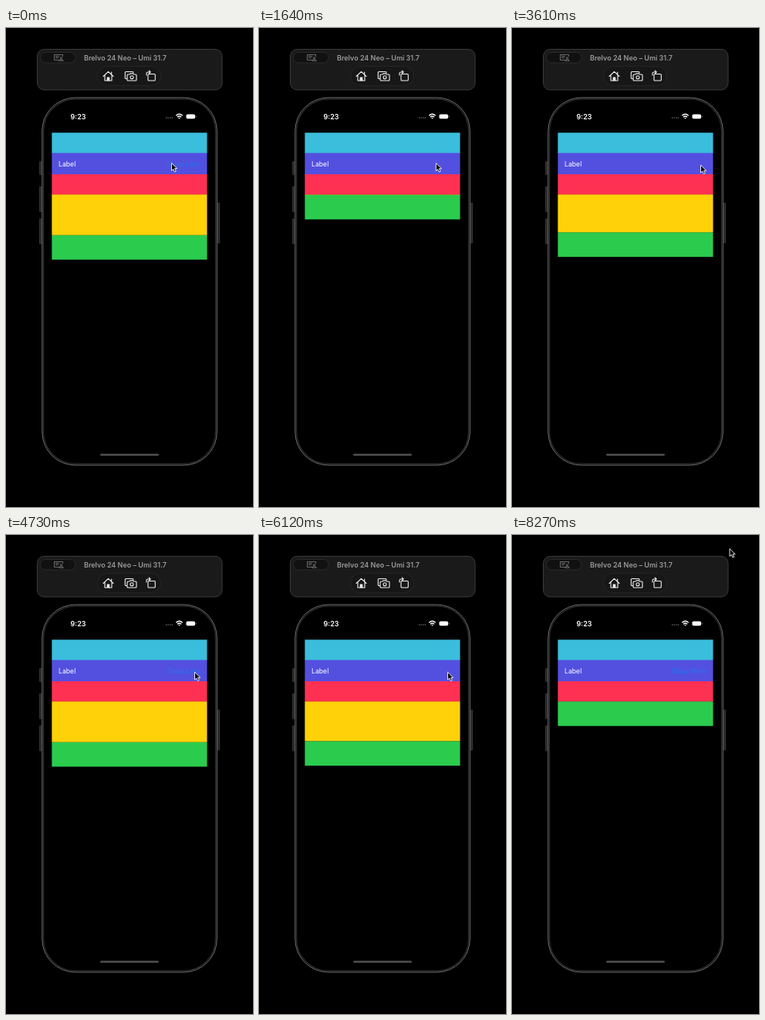
Recreate the animation shown at these times as an HTML page. Size 320x619 px, loop 8300 ms.

```html
<!DOCTYPE html>
<html lang="en">
<head>
<meta charset="utf-8">
<title>Collapsible stack</title>
<style>
  html, body { margin: 0; width: 100%; height: 100%; overflow: hidden; background: #000; }
  svg { display: block; width: 100vw; height: 100vh; }
  text { font-family: Inter, Roboto, sans-serif; }
  .icon { fill: none; stroke: #f2f2f2; stroke-width: 1.1; stroke-linejoin: round; stroke-linecap: round; }
</style>
</head>
<body>
<svg viewBox="0 0 320 619">
  <rect width="320" height="619"/>

  <!-- toolbar -->
  <rect x="40.5" y="27.5" width="239.5" height="52.5" rx="9" fill="#1a1a1a" stroke="#3b3b3b"/>
  <rect x="44.5" y="31.5" width="45.5" height="13.5" rx="6.7" fill="#111" stroke="#303030" stroke-width=".8"/>
  <g fill="none" stroke="#858585" stroke-width=".8">
    <path d="M69 41.5H62.5V34.5H73.5V37M64 36.5H69M64 38.5H68"/>
    <circle cx="71.5" cy="38.8" r="1.2"/>
    <path d="M68.8 42.3Q69 40.6 71.5 40.6T74.3 42.3Z"/>
  </g>
  <text x="154.5" y="41.5" text-anchor="middle" font-size="9" font-weight="600" fill="#9a9a9a">Brelvo 24 Neo – Umi 31.7</text>
  <rect x="118.5" y="49.5" width="82" height="25" rx="12.5" fill="#171717" stroke="#292929" stroke-width=".8"/>
  <g class="icon">
    <path d="M126 62.5L132.5 56.3L139 62.5M128 61.5V68H137V61.5M136.7 57V59.5"/>
    <path d="M131.2 68V64H133.8V68" fill="#f2f2f2"/>
    <path d="M156.5 65.5H155.3Q154.3 65.5 154.3 64.5V57.5Q154.3 56.5 155.3 56.5H164Q165 56.5 165 57.5V58"/>
    <path d="M158 60H160L161 58.9H164.5L165.500 60H168Q169 60 169 61V67Q169 68 168 68H158Q157 68 157 67V61Q157 60 158 60Z"/>
    <circle cx="163" cy="63.8" r="2"/>
    <rect x="184" y="59.500" width="9.300" height="8.500" rx="1"/>
    <path d="M182 61V59Q182 57 184 57H187M185.300 55.200L187.200 57L185.300 58.800"/>
  </g>

  <!-- device -->
  <g fill="#2b2b2b" stroke="#454545" stroke-width=".6">
    <rect x="43.400" y="172.500" width="3" height="17" rx="1"/>
    <rect x="43.400" y="205" width="3" height="32.500" rx="1"/>
    <rect x="43.400" y="246.500" width="3" height="32.500" rx="1"/>
    <rect x="273.700" y="226" width="3" height="52" rx="1"/>
  </g>
  <rect x="46.800" y="90" width="226.500" height="475" rx="43" fill="#080808" stroke="#707070" stroke-width="1"/>
  <rect x="48.600" y="91.800" width="222.900" height="471.400" rx="41.200" fill="#000" stroke="#303030" stroke-width="1.200"/>
  <rect x="122" y="550.200" width="76" height="2.600" rx="1.300" fill="#505050"/>

  <!-- status bar -->
  <text x="83.500" y="117.700" font-size="9" font-weight="600" fill="#fff">9:23</text>
  <path d="M207 116H216" stroke="#666" stroke-width="1.300" stroke-dasharray="1.300 1.250"/>
  <g fill="none" stroke="#fff" stroke-width="1.400">
    <path d="M220.300 113.200Q224.500 109.500 228.700 113.200M222 115.100Q224.500 113 227 115.100"/>
    <path d="M223.200 116.200Q224.500 115.200 225.800 116.200L224.500 117.600Z" fill="#fff" stroke="none"/>
  </g>
  <rect x="233.500" y="111.500" width="11.500" height="5.800" rx="1.800" fill="#fff"/>
  <rect x="245.700" y="113.300" width=".9" height="2.200" rx=".4" fill="#888"/>

  <!-- stack -->
  <g>
    <rect x="59.400" y="135.300" width="201.100" height="26.700" fill="#3abedb"/>
    <rect x="59.400" y="161.500" width="201.100" height="28" fill="#5350df"/>
    <rect x="59.400" y="189" width="201.100" height="26.500" fill="#ff3153"/>
    <rect id="panel" x="59.400" y="215.200" width="201.100" fill="#fed109"/>
    <rect id="footer" x="59.400" width="201.100" height="31.600" fill="#2bcb4e"/>
  </g>
  <text x="68" y="178.600" font-size="8.700" fill="#fff">Label</text>
  <text id="toggle" x="252" y="178.600" text-anchor="end" font-size="8.600" fill="#1c78ee"></text>

  <path id="cursor" d="M0 0V9.800L2.300 7.800L3.900 11.400L5.700 10.600L4.100 7.100H7.200Z"
        fill="#000" stroke="#fff" stroke-width=".9" stroke-linejoin="round"/>
</svg>
<script>
  const LOOP = 8300, PANEL_TOP = 215.2, PANEL_HEIGHT = 52.6;
  const presses = [1360, 3360, 4730, 5850, 7000];
  // time, x, y
  const cursorPath = [
    [30, 214.5, 174.5], [610, 229.3, 174.7], [2240, 229.3, 174.7],
    [2640, 255, 177.700], [2900, 255, 177.700], [3250, 244.500, 177.200],
    [7420, 244.500, 177.200], [7800, 288.500, 5], [7960, 291, 8], [8260, 282, 17.700]
  ];

  const byId = id => document.getElementById(id);
  const panel = byId('panel'), footer = byId('footer'), toggle = byId('toggle'), cursor = byId('cursor');
  const progress = (t, start, end) => Math.min(1, Math.max(0, (t - start) / (end - start)));
  const ease = p => (1 - Math.cos(Math.PI * p)) / 2;

  function cursorAt(t) {
    const next = cursorPath.findIndex(key => key[0] > t);
    if (next === 0) return cursorPath[0].slice(1);
    if (next < 0) return cursorPath[cursorPath.length - 1].slice(1);
    const [t0, x0, y0] = cursorPath[next - 1], [t1, x1, y1] = cursorPath[next];
    const p = ease(progress(t, t0, t1));
    return [x0 + (x1 - x0) * p, y0 + (y1 - y0) * p];
  }

  function render(t) {
    let open = 1, expanded = true, opacity = 1;
    presses.forEach((start, i) => {
      const age = t - start;
      if (age < 0) return;
      const p = ease(progress(age, 10, 300));
      open = i % 2 ? p : 1 - p;
      if (age > 200) expanded = i % 2 === 1;
      opacity = age < 200 ? 1 - progress(age, 0, 100) : progress(age, 310, 690);
    });
    const height = PANEL_HEIGHT * open;
    panel.setAttribute('height', height);
    footer.setAttribute('y', PANEL_TOP + height);
    toggle.textContent = expanded ? 'Show Less' : 'Show More';
    toggle.setAttribute('opacity', opacity);
    cursor.setAttribute('transform', `translate(${cursorAt(t).join(' ')})`);
  }

  const begin = performance.now();
  function tick() {
    render((performance.now() - begin) % LOOP);
    requestAnimationFrame(tick);
  }
  tick();
</script>
</body>
</html>
```
